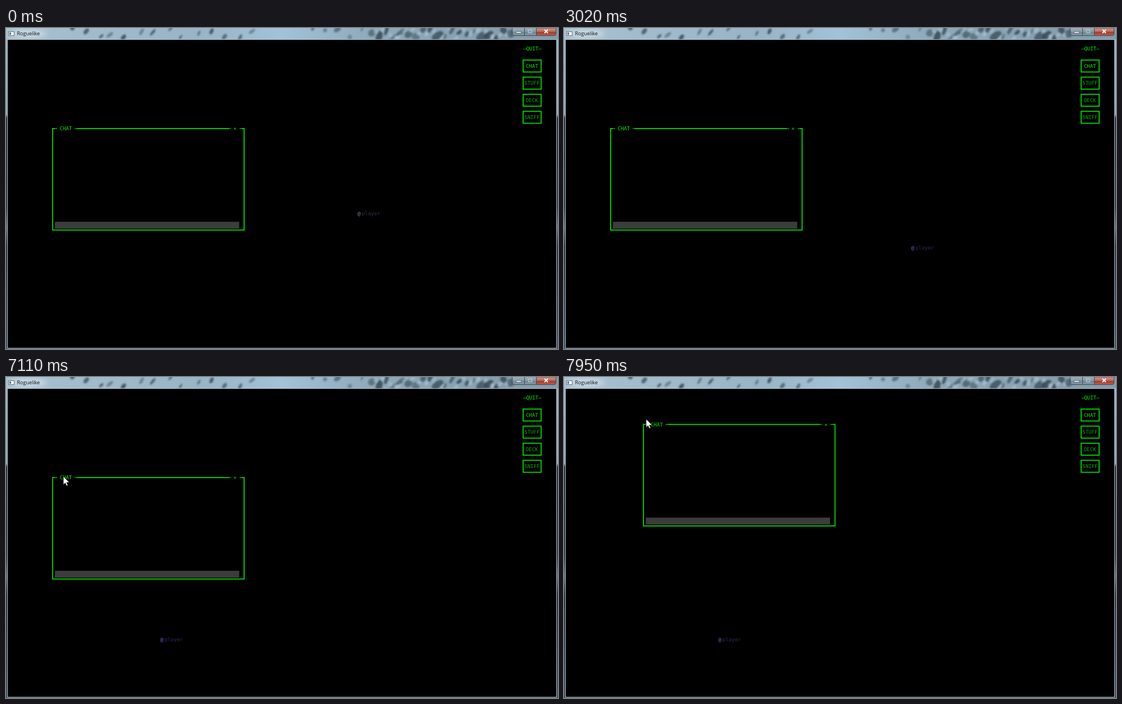
Animation of 981x571 px, one loop 8000 ms. Source, as an HTML page:

```html
<!DOCTYPE html>
<html lang="en">
<head>
<meta charset="utf-8">
<title>Roguelike</title>
<style>
  html, body { margin: 0; width: 100%; height: 100%; overflow: hidden; background: #000; }
  svg { display: block; width: 981px; height: 571px; }
  text { font: 9px "DejaVu Sans Mono", monospace; white-space: pre; }
  .caption { font: 9px "Open Sans", sans-serif; fill: #0c1116; }
  .line { fill: none; stroke: #00e400; stroke-width: 1.7; }
  .thin { fill: none; stroke: #00c800; stroke-width: 1.1; }
  .lit { fill: #00ec00; }
  .dim { fill: #00ae00; }
  .mid { text-anchor: middle; }
</style>
</head>
<body>
<svg viewBox="0 0 981 571">
  <defs>
    <linearGradient id="glass">
      <stop offset="0" stop-color="#a9c1d0"/>
      <stop offset=".35" stop-color="#98b4c6"/>
      <stop offset=".5" stop-color="#a3c2d7"/>
      <stop offset=".66" stop-color="#8eaabb"/>
      <stop offset="1" stop-color="#819bab"/>
    </linearGradient>
    <linearGradient id="side" x2="0" y2="1">
      <stop offset="0" stop-color="#9bb5c5"/>
      <stop offset=".27" stop-color="#8ba6b7"/>
      <stop offset=".28" stop-color="#1c2733"/>
      <stop offset=".56" stop-color="#263340"/>
      <stop offset=".62" stop-color="#5d6a74"/>
      <stop offset=".68" stop-color="#1d2a36"/>
      <stop offset="1" stop-color="#34495a"/>
    </linearGradient>
    <linearGradient id="grey" x2="0" y2="1">
      <stop offset="0" stop-color="#a9b8c2"/>
      <stop offset=".48" stop-color="#8797a2"/>
      <stop offset=".5" stop-color="#60717d"/>
      <stop offset="1" stop-color="#8597a3"/>
    </linearGradient>
    <linearGradient id="red" x2="0" y2="1">
      <stop offset="0" stop-color="#cf9a8b"/>
      <stop offset=".48" stop-color="#bb6859"/>
      <stop offset=".5" stop-color="#a13a2d"/>
      <stop offset="1" stop-color="#bd5c48"/>
    </linearGradient>
    <filter id="soft" x="-5%" y="-50%" width="110%" height="200%"><feGaussianBlur stdDeviation="1.5"/></filter>
    <filter id="glow" x="-50%" y="-100%" width="200%" height="300%"><feGaussianBlur stdDeviation="5"/></filter>
    <clipPath id="bar"><rect width="981" height="20"/></clipPath>
  </defs>

  <rect width="981" height="571" fill="url(#side)"/>
  <g clip-path="url(#bar)">
    <rect width="981" height="20" fill="url(#glass)"/>
    <g id="drops" filter="url(#soft)"></g>
    <ellipse cx="40" cy="10" rx="32" ry="7" fill="#dbe6ed" opacity=".7" filter="url(#glow)"/>
  </g>
  <rect x="2.5" y="20.5" width="976" height="549" fill="#000" stroke="#b4c3cc"/>

  <rect x="4.5" y="6.5" width="10" height="7" fill="#eef2f4" stroke="#66757f"/>
  <rect x="6" y="8" width="3" height="4" fill="#5f7885"/>
  <text class="caption" x="19.5" y="13">Roguelike</text>

  <g stroke="#3d4a53">
    <path d="M899.5 0V10q0 3.5 3.5 3.5H942.5V0M921.5 0V13.5" fill="url(#grey)" fill-opacity=".6"/>
    <path d="M942.5 0V13.5H974q3.5 0 3.5-3.5V0z" fill="url(#red)"/>
  </g>
  <rect x="906.5" y="6.5" width="9" height="2.5" fill="#fff" stroke="#4b5860" stroke-width=".7"/>
  <rect x="928.5" y="3.5" width="6" height="5" fill="none" stroke="#b9c5cc" stroke-width="1.3"/>
  <path d="M957 3l6 6m0-6l-6 6" stroke="#fff" stroke-width="1.8"/>

  <g id="menu">
    <text class="lit mid" x="935.3" y="40.3">QUIT</text>
    <path class="thin" d="M919.5 37.5h5M946.5 37.5h5" stroke-dasharray="2.2 .6"/>
  </g>

  <g id="player">
    <text id="hero" x="624.7" y="333">@</text>
    <text id="tag" x="632.3" y="333">player</text>
  </g>

  <g id="chat">
    <rect width="342" height="182" fill="#000"/>
    <path class="line" d="M5 .9H.8V181.4H341.2V.9H337M44 .9H314"/>
    <path class="thin" d="M5 .9h4M40 .9h4M314 .9h4M333 .9h4"/>
    <text class="lit" x="13.5" y="4">CHAT</text>
    <text class="lit mid" x="325" y="4">×</text>
    <rect x="5" y="166.7" width="327.5" height="12.3" fill="#3c3c3c"/>
  </g>

  <path id="cursor" d="M0 0V14.5L3.3 11.4L5.700 16.6L8 15.6L5.700 10.5H10.5z"
        fill="#fff" stroke="#222" stroke-width=".8"/>
</svg>
<script>
const LOOP = 8000, TICK = 76.6, CELL = 7.62, STRIDE = 4;
const $ = id => document.getElementById(id);

function add(parent, name, attrs, text = "") {
  const el = document.createElementNS("http://www.w3.org/2000/svg", name);
  for (const key in attrs) el.setAttribute(key, attrs[key]);
  el.textContent = text;
  parent.append(el);
}

["CHAT", "STUFF", "DECK", "SNIFF"].forEach((label, i) => {
  const y = 57 + i * 30.4;
  add($("menu"), "rect", { class: "line", x: 919, y, width: 32, height: 21.3 });
  add($("menu"), "text", { class: (i ? "dim" : "lit") + " mid", x: 934.8, y: y + 14 }, label);
});

let seed = 7;
const random = () => (seed = seed * 16807 % 2147483647) / 2147483647;

// Slanted rain smears behind the glass: small on the left, heavy on the right
function smear(x, size, fill) {
  const cy = random() * 18, rx = size * (.5 + random()), ry = size * (1 + random() * 1.5);
  const turn = 15 + random() * 45;
  add($("drops"), "ellipse", { cx: x, cy, rx, ry, fill, opacity: .4 + random() * .4,
    transform: `rotate(${turn} ${x} ${cy})` });
}
for (let x = 118; x < 455; x += 14 + random() * 20) smear(x, 3, "#2c3d49");
for (let x = 545; x < 640; x += 22) smear(x, 3, "#4a606f");
for (let x = 650; x < 900; x += 13) {
  smear(x, 5, "#2c3d49");
  smear(x + 7, 2.5, "#b3cbd9");
}

// Key presses: time, direction, cells
const walks = [
  [630, "right", 15], [1090, "up", 15], [1700, "left", 8], [2090, "down", 23],
  [2790, "left", 4], [2940, "left", 4], [4180, "down", 20], [4563, "left", 38],
  [5180, "up", 10], [5560, "left", 7]
];
const headings = { right: [1, 0], left: [-1, 0], up: [0, -1], down: [0, 1] };

// Pointer key points: tick, x, y
const MOUSE_START = 6570, GRAB = 7;
const pointer = [
  [0, 130, 347], [3, 57, 250], [GRAB, 102, 177], [9, 246, 143], [11, 263, 125],
  [12, 254.6, 111.4], [13, 234, 102], [17, 160.4, 82.5], [18, 146, 75]
];

const ticksSince = (t, start) => Math.floor((t - start) / TICK + 1e-6);
const place = (id, x, y) => $(id).setAttribute("transform", `translate(${x} ${y})`);

function pointerAt(tick) {
  const next = Math.max(1, pointer.findIndex(p => p[0] >= tick));
  const [t0, x0, y0] = pointer[next - 1], [t1, x1, y1] = pointer[next];
  const part = (tick - t0) / (t1 - t0);
  return [x0 + (x1 - x0) * part, y0 + (y1 - y0) * part];
}

function draw(t) {
  let col = 0, row = 0;
  for (const [start, key, cells] of walks) {
    if (t < start) break;
    const walked = Math.min(cells, STRIDE * (ticksSince(t, start) + 1));
    col += headings[key][0] * walked;
    row += headings[key][1] * walked;
  }
  place("player", col * CELL, row * CELL);
  const moved = t >= walks[0][0];
  $("hero").setAttribute("fill", moved ? "#7566dc" : "#7890a0");
  $("tag").setAttribute("fill", moved ? "#32275e" : "#2e324c");

  // The window trails the pointer by one tick
  const tick = ticksSince(t, MOUSE_START);
  const [x, y] = pointerAt(Math.max(GRAB, tick - 1));
  place("chat", x - 20, y + 1);
  $("cursor").style.display = tick < 0 ? "none" : "";
  if (tick >= 0) place("cursor", ...pointerAt(tick));
}

const begin = performance.now();
function frame() {
  draw((performance.now() - begin) % LOOP);
  requestAnimationFrame(frame);
}
frame();
</script>
</body>
</html>
```
